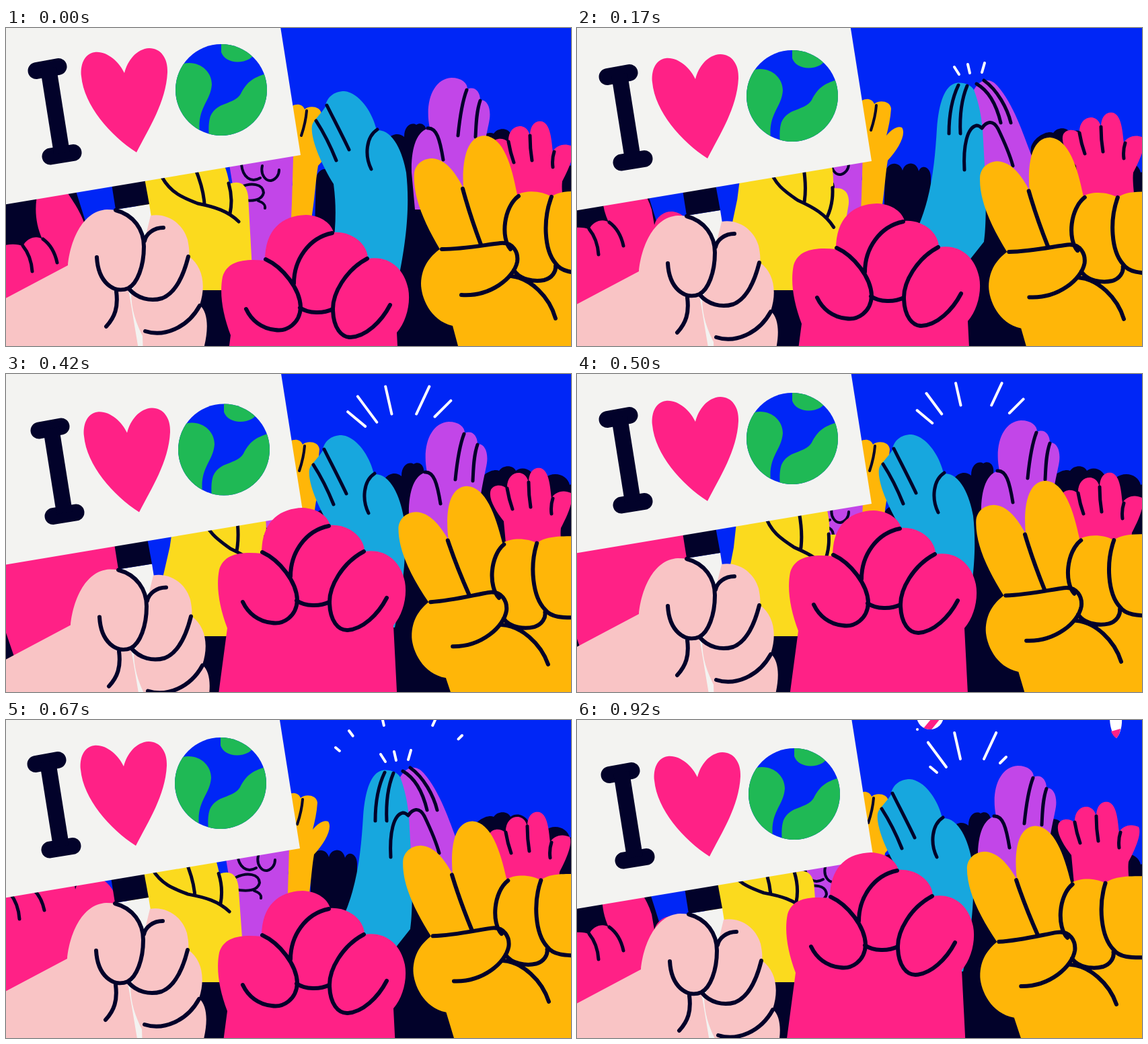
These frames come from a looping animation (840x473 px, 1.01 s). An HTML page:

```html
<!DOCTYPE html>
<html lang="en">
<head>
<meta charset="utf-8">
<title>Raised hands</title>
<style>
  html, body { margin: 0; width: 100%; height: 100%; overflow: hidden; background: #0026f6; }
  svg { display: block; width: 100vw; height: 100vh; }
  .navy { fill: #02022a; }
  .pink { fill: #ff2186; }
  .pale { fill: #f9c4c5; }
  .orange { fill: #ffb608; }
  .yellow { fill: #fbda1e; }
  .purple { fill: #c246e8; }
  .sky { fill: #17a7de; }
  .white { fill: #f3f3f1; }
  .green { fill: #1fb955; }
  .blue { fill: #0026f6; }
  .ink { fill: none; stroke: #02022a; stroke-width: 6; stroke-linecap: round; stroke-linejoin: round; }
  .thin { stroke-width: 5; }
  .fine { stroke-width: 4; }
  .ray { fill: none; stroke: #fff; stroke-width: 4; stroke-linecap: round; }
</style>
</head>
<body>
<svg viewBox="0 0 840 473" preserveAspectRatio="none">
  <defs>
    <clipPath id="globe"><circle cx="320" cy="92" r="68"/></clipPath>
    <clipPath id="ball"><circle cx="525" cy="-6" r="20"/></clipPath>
  </defs>

  <rect class="blue" width="840" height="473"/>
  <path id="rays" class="ray"/>
  <path id="ticks" class="ray" d="M561 58L568 69M581 54L584 67M606 52L602 66"/>

  <g id="confetti">
    <g clip-path="url(#ball)">
      <rect fill="#fff" x="500" y="-30" width="50" height="50"/>
      <path class="pink" d="M512 16L532 -8L545 -8L524 18Z"/>
    </g>
    <circle cx="506" cy="14" r="2" fill="#fff"/>
    <path fill="#fff" d="M792 -4H810C811 10 807 22 802 27C796 22 792 10 792 -4Z"/>
    <path class="pink" d="M794 17L808 13C807 20 805 24 802 27C798 25 796 21 794 17Z"/>
  </g>

  <!-- crowd -->
  <g class="navy">
    <path id="crowdFist" d="M560 480L562 182C562 162 580 152 592 162C592 144 604 140 610 144C618 139 627 146 625 158L640 200V480Z"/>
    <path id="crowdNear" d="M690 320L700 165C705 149 725 140 733 144C740 134 755 136 758 144C768 136 785 142 788 160L790 320Z"/>
    <path id="crowdFar" d="M750 420C755 150 790 140 800 155C815 143 835 150 838 165C850 160 862 170 864 420Z"/>
    <path id="crowdHand" d="M455 330L458 215C462 198 480 198 484 212C488 198 505 198 508 213C512 202 526 206 526 222V330Z"/>
    <path d="M0 300H840V473H0ZM0 230H100L122 300H0ZM590 270H840V310H590Z"/>
  </g>

  <g id="orangeBack">
    <path class="orange" d="M400 280L424 225L418 115C422 104 438 102 442 113C447 107 466 107 467 120C466 135 463 148 460 160C468 150 477 145 483 148C490 158 478 180 462 197C458 220 458 240 450 290L418 290Z"/>
    <path class="ink fine" d="M445 115C444 128 441 140 437 152"/>
  </g>

  <g id="pinkRight">
    <path class="pink" d="M750 290L742 205C730 190 718 170 723 158C728 150 740 150 747 157C746 140 756 132 766 133C775 135 778 142 779 148C779 130 788 124 797 126C810 130 811 155 813 171C817 162 830 157 842 163C848 175 832 205 827 215C825 230 830 250 830 290Z"/>
    <path class="ink thin" d="M747 156C749 168 751 176 755 187M779 147C779 160 780 172 782 184M815 171C812 180 812 186 813 194"/>
  </g>

  <!-- clapping pair, apart and together -->
  <g id="purpleOpen">
    <path class="purple" d="M608 270L603 215C602 180 610 152 630 149C622 110 635 76 662 74C678 74 686 82 686 91C697 86 705 95 705 107C716 106 721 120 719 135C716 155 708 175 700 270Z"/>
    <path class="ink thin" d="M685 92C678 110 674 140 672 160M705 108C699 125 699 145 698 162M627 149C640 148 645 165 650 196"/>
  </g>
  <g id="skyOpen">
    <path class="sky" d="M478 380C487 325 494 285 487 232C470 205 452 165 455 145C457 137 465 132 475 117C476 104 487 94 503 94C525 96 545 125 551 152C575 150 590 185 595 215C600 260 597 310 582 380Z"/>
    <path class="ink thin" d="M477 115C488 137 500 160 510 181M461 138C472 155 483 177 491 197M552 151C535 162 533 190 543 210"/>
  </g>
  <g id="clap">
    <path class="purple" d="M590 92C600 74 615 74 625 86C650 115 662 155 676 190L692 250L608 270L598 150Z"/>
    <path class="sky" d="M503 305C527 255 532 200 535 150C538 110 547 86 563 82C575 80 586 85 590 92C597 110 601 130 603 150L608 240C608 285 607 305 605 318L586 342L560 380L490 350Z"/>
    <path class="ink thin" d="M567 85C555 110 553 135 553 157M580 86C570 110 569 135 570 157M594 83C615 95 625 120 630 141M605 78C625 92 640 120 645 141M576 211C574 175 580 148 594 145C598 145 600 147 602 149C608 140 618 135 626 150C638 175 644 190 648 205"/>
  </g>

  <g id="purpleFist">
    <path class="purple" d="M328 160C330 220 345 240 350 370H420L425 260L428 160Z"/>
    <path class="ink fine" d="M381 205C378 218 386 228 394 227C402 225 406 218 406 211M350 203C352 222 364 231 378 223M348 237C365 229 382 232 383 245C380 258 362 258 346 255M375 257C383 260 386 263 385 268"/>
  </g>

  <g id="pinkLeft">
    <path class="pink" d="M-30 340C-20 322 15 318 25 325C30 312 46 308 54 314C43 290 42 265 48 240C52 215 75 215 88 240C100 258 112 275 118 295L122 318C128 298 150 292 165 305C185 320 190 345 190 400V620H60L34 535L22 500L-10 440Z"/>
    <path class="ink thin" d="M25 324C34 335 38 348 39 362M55 314C66 322 73 335 76 349"/>
  </g>

  <g id="yellowFist">
    <path class="yellow" d="M200 440L197 280L188 190L318 190C326 205 330 218 332 232C350 225 358 235 360 250L368 395V440Z"/>
    <path class="ink thin" d="M232 222C245 245 262 252 285 261C310 266 330 272 346 288M281 208C288 225 294 245 295 262M331 231C336 248 336 262 333 276"/>
  </g>
  <rect class="navy" x="200" y="390" width="180" height="83"/>

  <g id="sign">
    <path class="white" d="M163 270L213 262L249 490H192Z"/>
    <path class="navy" d="M157 232L206 224L213 262L163 270Z"/>
    <path class="white" d="M-40 -40H402L438 189L-40 269Z"/>
    <g class="ink" style="stroke-width:25">
      <path d="M45 63.5L78 57.5M66 191L100 185.5"/>
      <path d="M63 60L83 186" stroke-width="24" stroke-linecap="butt"/>
    </g>
    <path class="pink" d="M176 67C168 50 150 34 132 36C116 38 110 56 112 72C116 115 155 160 194 185C212 150 238 110 240 66C241 45 230 30 213 30C194 31 181 48 176 67Z"/>
    <g clip-path="url(#globe)">
      <rect class="blue" x="250" y="20" width="140" height="142"/>
      <path class="green" d="M240 60L264 53C288 48 306 65 306 84C304 110 284 118 288 156L240 165ZM320 15V36C325 50 345 55 362 46L372 38L360 10ZM395 66C368 72 358 80 349 98C338 115 314 109 304 131C301 140 301 150 302 170H395Z"/>
    </g>
    <path class="pale" d="M-40 423L92 353C95 320 112 272 150 270C190 270 206 300 206 325C206 360 195 385 182 389L184 400L199 490H-40Z"/>
    <path class="pale" d="M205 320L215 279C237 275 262 288 270 315C272 325 273 332 272 340C292 354 298 382 288 412C303 425 301 457 290 490H204L203 458C194 440 186 420 186 392C200 370 206 350 205 320Z"/>
    <path class="ink" d="M163 271C190 278 205 300 205 325C205 355 195 380 182 387C160 396 137 378 135 341M206 317C208 306 220 297 234 297M182 387C195 403 215 407 232 402C252 394 264 368 271 340M207 451C235 460 270 446 288 413M164 392C167 415 162 430 149 444"/>
  </g>

  <g id="fist">
    <path class="pink" d="M319 570L334 457C322 425 317 395 322 370C329 346 355 343 385 346C385 300 410 279 446 278C470 279 484 292 487 304C515 302 538 322 538 343C570 338 592 358 598 388C602 410 595 437 581 453L587 570Z"/>
    <path class="ink" d="M386 344C412 356 437 388 438 415C437 440 417 452 400 449C380 447 365 435 357 418M485 305C450 312 428 345 428 380M437 416C450 425 472 425 486 418M537 343C505 360 485 395 486 420C487 447 499 460 512 460C535 459 558 437 571 412"/>
  </g>

  <g id="peace">
    <path class="orange" d="M690 540L664 443C630 435 617 400 617 380C618 355 630 340 645 329C622 290 604 250 607 215C610 200 622 194 634 194C655 196 668 215 680 238C678 205 682 160 712 160C740 163 752 205 760 248C775 240 798 243 811 251C822 243 838 241 880 245V540Z"/>
    <path class="ink" d="M679 239C686 265 697 298 706 322M648 329C680 329 715 322 735 320C755 318 762 335 760 348C755 372 720 400 677 397M762 250C740 266 735 312 750 329M755 360C763 374 785 378 800 375C812 372 818 362 817 354M811 251C798 285 800 330 817 350C825 362 840 365 875 365M751 369C780 372 808 400 817 432"/>
  </g>
</svg>

<script>
const STARTS = [0, 80, 170, 250, 330, 420, 500, 580, 670, 750, 840, 920];
const LOOP = 1010;

// One "x y angle" pose per step; "-" hides the part.
const POSES = {
  sign: "0 0|-2 -1|0 9|3 18|5 22|4 20.5|0 4|-3 -7|-1 2|1 12|3 19|3 18",
  fist: "0 0|0 -4|0 -17|-2 -55|-4 -77|-5 -79|-5 -75|-5 -63|-5 -24|-6 -16|-8 -60|-9 -81",
  peace: "0 0|-2 0 -.2|-4 1 -1|-8 1 -2.6|-11 1 -3.3|-11 0 -3.4|-8 -4 -1.5|-5 -8 .2|-10 -13 -1.8|-12 -12 -2.8|-14 -10 -3.3|-15 -9 -3.3",
  skyOpen: "0 0|-11 -4 -.7|-|-1 -1|-3 -2|-4 -3|-6 -4|-14 -8 -.7|-|-|-7 -5|-8 -6",
  purpleOpen: "0 0|5 -4|-|-1 -1|-3 -2|-4 -3|-2 -5|3 -9|-|-|-6 -5|-7 -6",
  clap: "-|-|0 0|-|-|-|-|-|-4 -7|-4 -7|-|-",
  ticks: "-|-|0 0|-|-|-|-|-|-4 -7|-4 -9|-|-",
  confetti: "-|-|-|-|-|-|-|-|-|-|-|0 0",
  pinkRight: "0 13|0 5|0 0|0 8|-1 15|-2 14|-2 21|-3 26|-4 11|-5 1|-6 -5|-7 -4",
  orangeBack: "2 8|1 4|0 0|-1 -5|-1 -7|-1 -8|-2 -8|-3 -6|-4 3|-4 5|-4 4|-4 1",
  yellowFist: "0 0|8 -4 7|13 -7 13|15 -5 14|16 -4 14|16 -4 14|10 -5 12|2 -6 8|-12 -2 -1|-13 -2 -1|-9 -3 -1|-5 -4 -1",
  purpleFist: "0 0|-1 -6|-2 -9|-1 0|0 6|0 6|-2 -6|-4 -15|-6 -3|-9 8|-12 14|-12 14",
  pinkLeft: "0 0|-4 -12|-7 -25|-15 -80|-22 -115|-22 -115|-24 -112|-25 -100|-19 -66|-14 -40|-9 -12|-7 -6",
  crowdHand: "3 8|1 4|0 0|0 0|0 0|0 0|-2 -5|-5 -8|-4 -8|-5 -6|-6 -4|-6 -2",
  crowdFist: "0 0|-2 -2|-3 -4|-3 -5|-3 -6|-4 -10|-6 -11|-8 -10|-8 -8|-9 -6|-10 -5|-10 -5",
  crowdNear: "-8 13|-18 12|-25 12|-12 6|0 3|0 0|0 0|0 0|-8 0|-20 6|-34 10|-38 10",
  crowdFar: "0 40|0 48|0 50|0 20|0 3|0 0|0 0|0 0|0 10|0 30|0 48|0 50"
};
const PIVOTS = { peace: "816 432", yellowFist: "290 395", skyOpen: "540 340" };

// Rays run from (x1, y1) to (x2, y2); the outer two trail the inner three.
const RAYS = [
  [539, 82, 490, 41], [553, 74, 510, 16], [574, 62, 560, 0],
  [609, 62, 638, 0], [633, 68, 678, 23]
];
// Visible span per step: inner from, inner to, outer from, outer to
const SPANS = {
  3: [0, .3], 4: [0, .63, 0, .2], 5: [.04, .7, .1, .63], 6: [.25, .78, .22, .68],
  7: [.57, .86, .4, .76], 8: [.87, 1, .88, 1], 10: [0, .3], 11: [0, .63, 0, .2]
};

const byId = id => document.getElementById(id);
const parts = Object.entries(POSES).map(([id, text]) =>
  ({ el: byId(id), pivot: PIVOTS[id] || "0 0", poses: text.split("|") }));
const rays = byId("rays");

function rayPath(step) {
  const span = SPANS[step];
  if (!span) return "";
  return RAYS.map(([x1, y1, x2, y2], i) => {
    const [a, b] = i % 4 ? span : span.slice(2);
    if (b === undefined) return "";
    const at = k => `${x1 + (x2 - x1) * k} ${y1 + (y2 - y1) * k}`;
    return `M${at(a)}L${at(b)}`;
  }).join("");
}

function pose(step) {
  for (const { el, pivot, poses } of parts) {
    const hidden = poses[step] === "-";
    el.style.display = hidden ? "none" : "";
    if (hidden) continue;
    const [x, y, angle = 0] = poses[step].split(" ").map(Number);
    el.setAttribute("transform", `translate(${x} ${y}) rotate(${angle} ${pivot})`);
  }
  rays.setAttribute("d", rayPath(step));
  rays.setAttribute("transform", step > 9 ? "translate(-4 -4)" : "");
}

let start, shown = -1;
function tick(now) {
  start ??= now;
  const time = (now - start) % LOOP;
  const step = STARTS.filter(s => s <= time).length - 1;
  if (step !== shown) pose(shown = step);
  requestAnimationFrame(tick);
}
pose(0);
requestAnimationFrame(tick);
</script>
</body>
</html>
```
